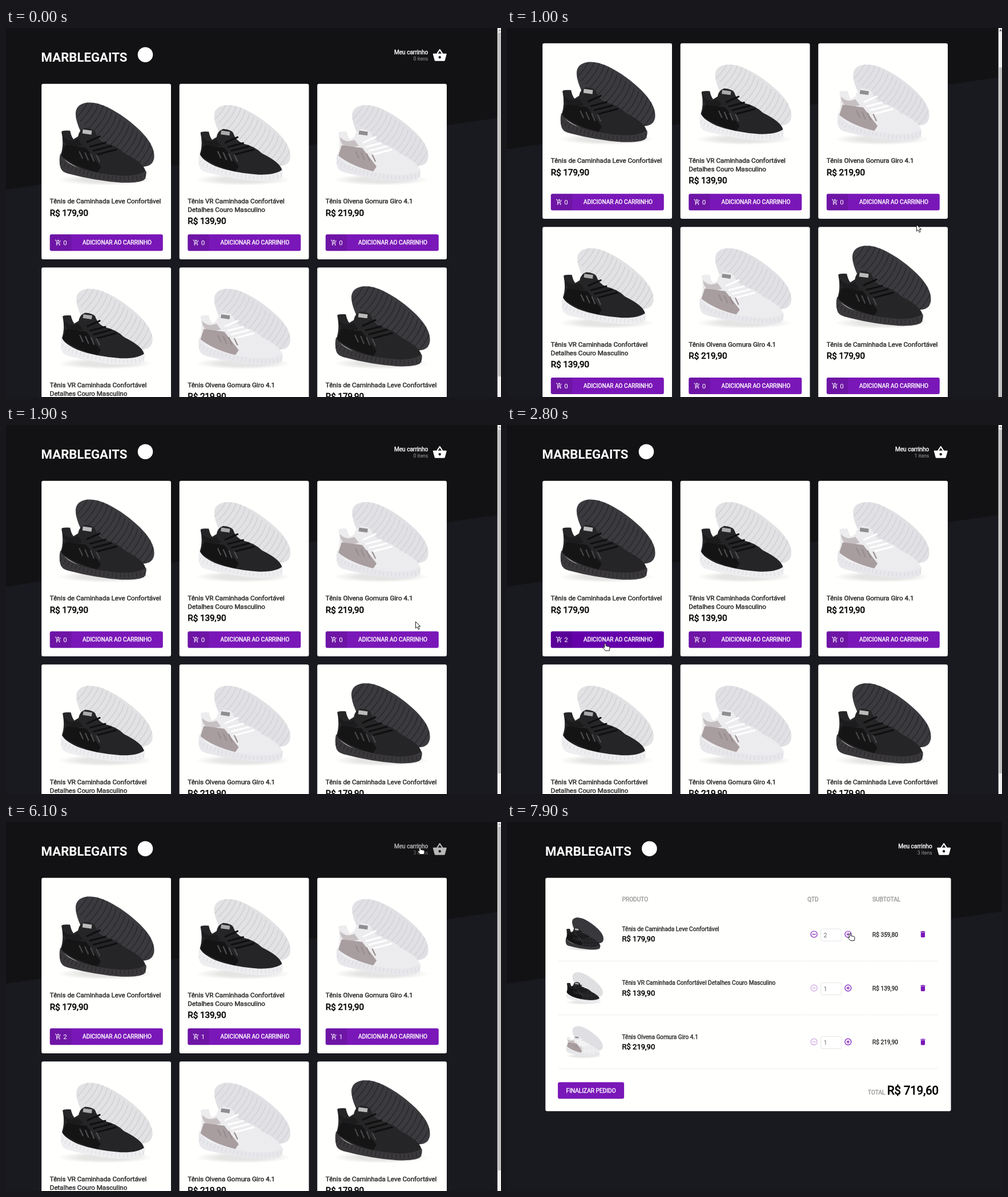
These frames come from a looping animation (867 px wide and 646 px high, 8 s). An HTML page:

```html
<!DOCTYPE html>
<html lang="pt-BR">
<head>
<meta charset="utf-8">
<title>Loja de tênis</title>
<style>
html, body { margin: 0; width: 100%; height: 100%; overflow: hidden; background: #191920; }
svg { display: block; }
text { font-family: Roboto, Arial, sans-serif; fill: currentColor; white-space: pre; }
.strong { stroke: currentColor; stroke-width: .04em; }
.end { text-anchor: end; }
.btn { fill: #7a17b8; }
.btn.on { fill: #6400aa; }
</style>
</head>
<body>
<svg id="stage" width="867" height="646" viewBox="0 0 867 646"></svg>
<script>
const LOOP = 8000, ROW = 94.2;
const paths = {
  addCart: 'M11 9h2V6h3V4h-3V1h-2v3H8v2h3v3zm-4 9c-1.1 0-1.99.9-1.99 2S5.9 22 7 22s2-.9 2-2-.9-2-2-2zm10 0c-1.1 0-1.99.9-1.99 2s.89 2 1.99 2 2-.9 2-2-.9-2-2-2zm-9.83-3.25l.03-.12.9-1.63h7.45c.75 0 1.41-.41 1.75-1.03l3.86-7.01L19.42 4h-.01l-1.1 2-2.76 5H8.53l-.13-.27L6.16 6l-.95-2-.94-2H1v2h2l3.6 7.59-1.35 2.45c-.16.28-.25.61-.25.96 0 1.1.9 2 2 2h12v-2H7.42c-.13 0-.25-.11-.25-.25z',
  basket: 'M17.21 9l-4.38-6.56c-.19-.28-.51-.42-.83-.42-.32 0-.64.14-.83.43L6.79 9H2c-.55 0-1 .45-1 1 0 .09.01.18.04.27l2.54 9.27c.23.84 1 1.46 1.92 1.46h13c.92 0 1.69-.62 1.93-1.46l2.54-9.27L23 10c0-.55-.45-1-1-1h-4.79zM9 9l3-4.4L15 9H9zm3 8c-1.1 0-2-.9-2-2s.9-2 2-2 2 .9 2 2-.9 2-2 2z',
  bin: 'M6 19c0 1.1.9 2 2 2h8c1.1 0 2-.9 2-2V7H6v12zM19 4h-3.5l-1-1h-5l-1 1H5v2h14V4z',
  outsole: 'M60 56C58 38 72 32 88 33C114 34 153 62 173 82C193 102 199 118 197 131C194 144 184 146 170 145L88 118Q62 78 60 56Z',
  upper: 'M35 84Q36 81 50 82Q52 92 56 97L64 92Q66 80 76 77Q90 78 94 84Q98 98 112 104Q132 108 146 122Q178 138 182 152Q184 160 180 164Q150 168 100 158Q55 148 33 126Q40 108 35 84Z',
  sole: 'M33 122Q30 134 33 146Q35 154 46 157Q95 170 140 173Q170 174 180 168Q185 160 183 152Q170 162 140 161Q95 158 60 145Q40 137 33 122Z',
  heel: 'M41 107L78 112L104 146L98 155Q58 145 35 126Z',
  laces: 'M80 102L102 92M85 110L112 103M91 117L122 109M97 124L131 115',
  straps: 'M66 118l6 13M76 120l6 14M86 122l6 14M96 124l6 13'
};
const looks = [
  { out: '#3b3b3f', tread: '#29292c', upper: '#222224', heel: '#151516', sole: '#3a383b', ridge: '#272628', lace: '#0f0f10', strap: '#47474a', tag: '#bbb', fit: '' },
  { out: '#e2e2e4', tread: '#d0d0d4', upper: '#222224', heel: '#141415', sole: '#eeeef1', ridge: '#dcdce0', lace: '#0f0f10', strap: '#505054', tag: '#aaa', fit: 'matrix(.97 0 0 .95 3 6)' },
  { out: '#e1e1e5', tread: '#d2d2d7', upper: '#efeef0', heel: '#a89d9f', sole: '#e8e8ec', ridge: '#d8d8dd', lace: '#fff', strap: '#968b8d', tag: '#8f8d90', fit: 'matrix(.97 0 0 .95 3 6)' }
];
const products = [
  { lines: ['Tênis de Caminhada Leve Confortável'], price: '179,90', sub: '359,80', qty: 2 },
  { lines: ['Tênis VR Caminhada Confortável', 'Detalhes Couro Masculino'], price: '139,90', sub: '139,90', qty: 1 },
  { lines: ['Tênis Olvena Gomura Giro 4.1'], price: '219,90', sub: '219,90', qty: 1 }
];

const text = (x, y, size, str, color, cls = 'strong', id = '') =>
  `<text x="${x}" y="${y}" font-size="${size}" color="${color}" class="${cls}" id="${id}">${str}</text>`;
const rect = (x, y, w, h, fill, r = 0, more = '') =>
  `<rect x="${x}" y="${y}" width="${w}" height="${h}" rx="${r}" fill="${fill}" ${more}/>`;
const icon = (name, x, y, size, fill) =>
  `<path d="${paths[name]}" fill="${fill}" transform="translate(${x} ${y}) scale(${size / 24})"/>`;
const range = (n, f) => Array.from({ length: n }, (_, i) => f(i)).join('');

function shoe(c, i) {
  const treads = range(18, k => `M${86 + 7.5 * k} ${18 + 6 * k}q-4 20 -26 42`);
  return `<g id="shoe${i}"><ellipse cx="112" cy="168" rx="84" ry="10" fill="url(#shade)"/>
    <g transform="${c.fit}">
    <path d="${paths.outsole}" fill="${c.out}"/>
    <path d="${treads}" clip-path="url(#outsole)" fill="none" stroke="${c.tread}" stroke-width="1.6"/>
    <path d="${paths.upper}" fill="${c.upper}"/>
    <path d="${paths.upper}" fill="url(#mesh)"/>
    <path d="${paths.heel}" fill="${c.heel}"/>
    <path d="M38 92Q48 104 64 97L72 108L52 112Q38 106 38 92Z" fill="${c.heel}" opacity=".55"/>
    <path d="${paths.laces}" stroke="${c.lace}" stroke-width="3.2" stroke-linecap="round"/>
    <path d="${paths.straps}" stroke="${c.strap}" stroke-width="2.2"/>
    <path d="${paths.sole}" fill="${c.sole}"/>
    <path d="M34 138Q60 154 110 163Q150 170 182 162" fill="none" stroke="${c.ridge}" stroke-width="8" stroke-dasharray="1.2 6"/>
    ${rect(72, 81, 16, 7, c.tag, 0, 'transform="rotate(8 80 84)"')}</g></g>`;
}

function card(n) {
  const col = n % 3, row = (n - col) / 3;
  const kind = (col + row) % 3, p = products[kind];
  const extra = 14.5 * (p.lines.length - 1);
  return `<g transform="translate(${62.2 + 241.5 * col} ${97.7 + 321.6 * row})">
    ${rect(0, 0, 226.8, 307.2, '#fffffd', 3)}<use href="#shoe${kind}"/>
    ${p.lines.map((s, i) => text(14.6, 209.8 + 14.5 * i, 11.6, s, '#2c2c2c')).join('')}
    ${text(14.6, 231.2 + extra, 15.2, 'R$ ' + p.price, '#000')}
    <rect id="btn${n}" class="btn" x="14.6" y="263.6" width="198" height="29" rx="3"/>
    ${rect(14.6, 263.6, 37.6, 29, 'rgba(0,0,0,.1)', 3)}
    ${icon('addCart', 23.3, 272.2, 11.6, '#fff')}
    ${text(38, 282.4, 11.6, '0', '#fff', '', 'count' + n)}
    ${text(71.9, 281.8, 10.14, 'ADICIONAR AO CARRINHO', '#fff')}</g>`;
}

function round(x, y, plus, opacity = 1) {
  return `<path d="M${x - 3} ${y}h6${plus ? `M${x} ${y - 3}v6` : ''}" stroke="#7a17b8" stroke-width="1.2" opacity="${opacity}"/>
    <circle cx="${x}" cy="${y}" r="5.5" fill="none" stroke="#7a17b8" stroke-width="1.2" opacity="${opacity}"/>`;
}

function cartRow(p, i) {
  const border = [[90, 426], [517.5, 111.5], [630.5, 77.5], [709.5, 45.5]];
  return `<g transform="translate(0 ${ROW * i})">
    <use href="#shoe${i}" transform="translate(90.1 154.2) scale(.4)"/>
    ${text(201.5, 191.2, 10.14, p.lines.join(' '), '#2c2c2c')}
    ${text(201.5, 209.4, 13.04, 'R$ ' + p.price, '#000')}
    ${round(537.7, 196.5, false, p.qty > 1 ? 1 : .4)}${round(597.4, 196.5, true)}
    ${rect(549.7, 187.2, 36, 21.2, '#fff', 3, 'stroke="#ddd" stroke-width=".8"')}
    ${text(554.8, 201.6, 10.14, p.qty, '#666', '')}
    ${text(640, 200.6, 10.14, 'R$ ' + p.sub, '#2c2c2c')}
    ${icon('bin', 721.2, 189.3, 14.5, '#7a17b8')}
    ${border.map(([x, w]) => rect(x, 243, w, 1, '#eee')).join('')}</g>`;
}

const stage = document.getElementById('stage');
stage.innerHTML = `<defs>
  <clipPath id="outsole"><path d="${paths.outsole}"/></clipPath>
  <radialGradient id="shade"><stop offset=".5" stop-color="#888" stop-opacity=".22"/><stop offset="1" stop-color="#888" stop-opacity="0"/></radialGradient>
  <pattern id="mesh" width="3" height="3" patternUnits="userSpaceOnUse"><circle cx="1" cy="1" r=".6" fill="#888" opacity=".28"/></pattern>
  ${looks.map(shoe).join('')}</defs>
  ${rect(0, 0, 867, 646, '#191920')}
  <g id="page">
    <path id="slope" d="M0 0H867V156.5L0 283Z" fill="#121214"/>
    <g id="head">
      ${text(61.6, 58.6, 22.2, 'MARBLEGAITS', '#fff', '', 'brand')}
      <circle cx="244" cy="46.7" r="13.3" fill="#fff"/>
      <g id="cart">
        ${text(739.3, 45.8, 10.14, 'Meu carrinho', '#fff', 'strong end')}
        ${text(739.3, 57.4, 8.7, '', '#999', 'end', 'items')}
        ${icon('basket', 746.7, 34.9, 26.1, '#fff')}
      </g>
    </g>
    <g id="shop">${range(6, card)}</g>
    <g id="order">
      ${rect(67.3, 97.7, 710.3, 408.5, '#fffffd', 3)}
      ${text(201.5, 138.8, 10.14, 'PRODUTO', '#999')}
      ${text(526.3, 138.8, 10.14, 'QTD', '#999')}
      ${text(640, 138.8, 10.14, 'SUBTOTAL', '#999')}
      ${products.map(cartRow).join('')}
      ${rect(89.1, 455.6, 116, 29, '#7a17b8', 3)}
      ${text(103.6, 473.7, 10.14, 'FINALIZAR PEDIDO', '#fff')}
      ${text(662.5, 477.2, 10.14, 'TOTAL', '#999', 'strong end')}
      ${text(756, 477.2, 20.3, 'R$ 719,60', '#000', 'strong end')}
    </g>
  </g>
  <g id="bar">${rect(860.7, 0, 7, 646, '#f1f1f1')}
    <path id="arrow" d="M862 5.5l2.5-3.5l2.5 3.5z"/>
    <rect id="thumb" x="861.7" width="6" height="602" fill="#c1c1c1"/></g>
  <g id="cursor" stroke="#000" fill="#fff" stroke-linejoin="round">
    <path id="pointer" d="M.4 .4V11.8L3.1 9.4L5.2 13.7L7.2 12.8L5.2 8.6H8.8Z" stroke-width=".9"/>
    <path id="hand" d="M-1.2 1.4Q0 -.2 1.3 1.4V4.8L6.8 6Q8.3 6.6 8.1 8.6L7.3 13.2H.6L-3.6 8.5Q-4 6.7-2.5 6.8L-1.2 7.9Z" stroke-width=".9"/>
  </g>`;
const el = id => document.getElementById(id);
const show = (id, on) => el(id).style.display = on ? '' : 'none';
el('brand').setAttribute('font-weight', 700);

// Cursor moves: start, end, destination x, y
const moves = [
  [400, 700, 717, 344], [2000, 2200, 560, 330], [2200, 2500, 170, 383], [2600, 2700, 172, 382],
  [3400, 3700, 400, 385], [3800, 3900, 386, 380], [4000, 4100, 383, 378], [4500, 4800, 648, 376],
  [4900, 5000, 621, 375], [5300, 5900, 728, 41], [6000, 6100, 725, 43.5], [7000, 7900, 601, 194.5]
];
const scrolls = [[0, 0], [900, 36], [1000, 71], [1300, 76], [1600, 72], [1700, 55], [1800, 16], [1900, 0]];

function cursorAt(t) {
  let x = 665, y = 104;
  for (const [from, to, tx, ty] of moves) {
    const k = Math.min(1, Math.max(0, (t - from) / (to - from)));
    x += (tx - x) * k;
    y += (ty - y) * k;
  }
  return [x, y];
}

function draw(t) {
  const ordering = t >= 6700;
  const [x, y] = cursorAt(t);
  const scroll = scrolls.filter(s => s[0] <= t).pop()[1];
  const within = (l, top, r, b) => t >= 500 && x >= l && x <= r && y >= top && y <= b;
  const counts = [(t >= 2700) + (t >= 2800), +(t >= 4300), +(t >= 5300)];

  show('shop', !ordering);
  show('bar', !ordering);
  show('order', ordering);
  el('page').setAttribute('transform', `translate(0 ${-scroll})`);
  el('head').setAttribute('transform', `translate(${ordering ? 5.4 : 0} 0)`);
  el('thumb').setAttribute('y', 8 + scroll * .86);
  el('arrow').setAttribute('fill', scroll ? '#505050' : '#a3a3a3');
  el('items').textContent = counts.filter(Boolean).length + ' itens';

  let hand = within(680, 36, 778, 58);
  el('cart').setAttribute('opacity', hand ? .7 : 1);
  counts.forEach((n, i) => {
    const left = 76.8 + 241.5 * i;
    const over = !ordering && within(left, 361.3 - scroll, left + 198, 390.3 - scroll);
    el('count' + i).textContent = n;
    el('btn' + i).classList.toggle('on', over);
    hand = hand || over;
  });
  hand = hand || ordering && within(590, 189, 605, 204);

  show('cursor', t >= 500);
  show('hand', hand);
  show('pointer', !hand);
  el('cursor').setAttribute('transform', `translate(${x} ${y})`);
}

// The screen refreshes ten times a second
let last = -1;
function tick() {
  const t = Math.floor(performance.now() % LOOP / 100) * 100;
  if (t !== last) draw(last = t);
  requestAnimationFrame(tick);
}
tick();
</script>
</body>
</html>
```
